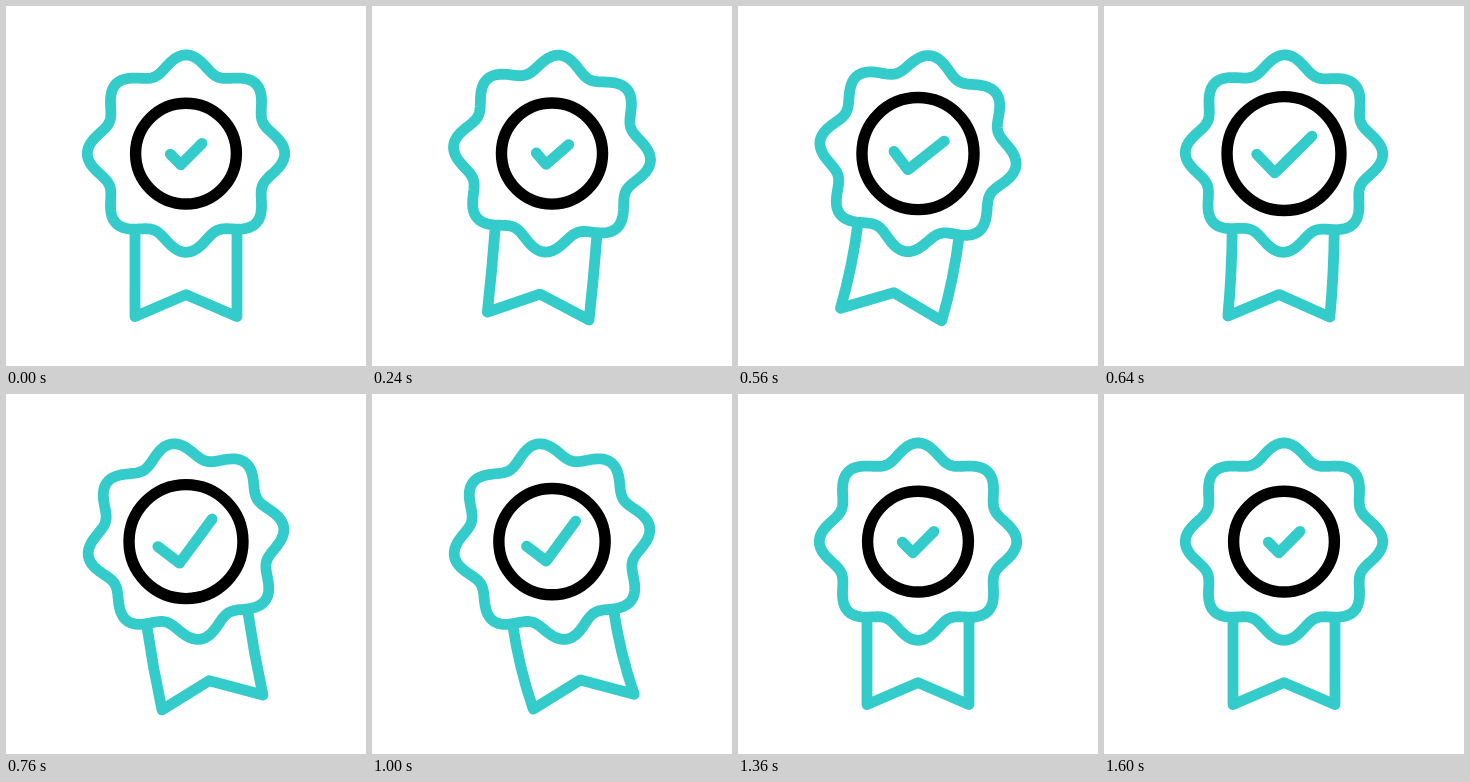
An HTML page for the animation above (1720 ms loop, 360x360 px).

```html
<!DOCTYPE html>
<html lang="en">
<head>
<meta charset="utf-8">
<title>Award badge</title>
<style>
  html, body { margin: 0; width: 100%; height: 100%; overflow: hidden; background: #fff; }
  svg { display: block; width: 100vw; height: 100vh; }
  path, circle {
    fill: none; stroke: #34cbcb; stroke-width: 10.8;
    stroke-linecap: round; stroke-linejoin: round;
  }
  #ring { stroke: #000; stroke-width: 11.4; }
</style>
</head>
<body>
<svg viewBox="0 0 360 360">
  <g transform="translate(180 147.6)">
    <g id="badge">
      <path id="ribbon"/>
      <path id="rosette"/>
      <path id="check"/>
    </g>
    <circle id="ring"/>
  </g>
</svg>
<script>
const LOOP = 1720, STEP = 40, LAST = 38;
const [badge, ribbon, rosette, check, ring] =
  ['badge', 'ribbon', 'rosette', 'check', 'ring'].map(id => document.getElementById(id));

// Smooth rise from 0 to 1 between two steps.
function ramp(x, from, to) {
  const u = Math.min(1, Math.max(0, (x - from) / (to - from)));
  return u * u * (3 - 2 * u);
}

function rosettePath() {
  const points = [];
  for (let deg = 0; deg < 360; deg++) {
    const a = deg * Math.PI / 180, r = 90.8 + 7.9 * Math.cos(8 * a);
    points.push((r * Math.cos(a)).toFixed(2) + ' ' + (r * Math.sin(a)).toFixed(2));
  }
  return 'M' + points.join('L') + 'Z';
}

// The ribbon's top is fixed to the rosette; its lower end swings by dx.
function ribbonPath(dx) {
  return `M-51 76Q-51 120 ${dx - 51} 163L${dx} 141L${dx + 51} 163Q51 120 51 76`;
}

function checkPath(size) {
  return `M${-15.7 * size} ${0.5 * size}L${-5.2 * size} ${11.2 * size}L${16 * size} ${-10.2 * size}`;
}

function draw(time) {
  const step = Math.min(LAST, Math.max(0, Math.floor(time % LOOP / STEP) - 2));
  const tilt = 8.7 * (ramp(step, 0, 8) - 2 * ramp(step, 10.7, 17.6) + ramp(step, 22.2, 28.9));
  const sway = 8.5 * (2 * ramp(step, 9.8, 21.5) - ramp(step, 1, 12.5) - ramp(step, 22, 29.5));
  const swell = ramp(step, 3, 15) - ramp(step, 16, 28.5);
  const grow = ramp(step, 5.9, 16) - ramp(step, 20.3, 29.4);

  badge.setAttribute('transform', `rotate(${tilt})`);
  ribbon.setAttribute('d', ribbonPath(sway));
  check.setAttribute('d', checkPath(1 + 0.82 * grow));
  ring.setAttribute('r', 50.4 + 6.7 * swell);
}

rosette.setAttribute('d', rosettePath());
const start = performance.now();
function tick() {
  draw(performance.now() - start);
  requestAnimationFrame(tick);
}
tick();
</script>
</body>
</html>
```
